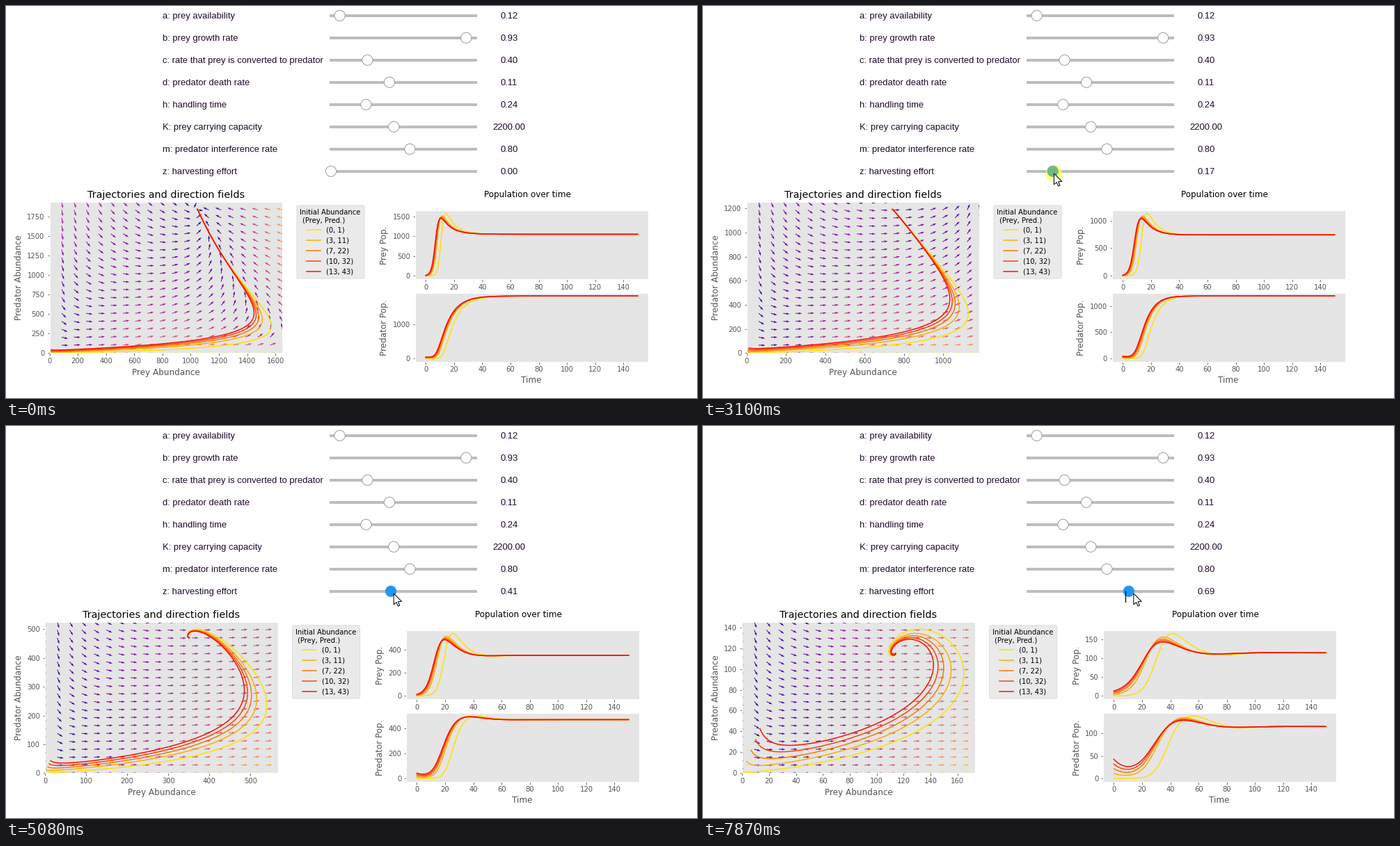
A matplotlib script for the animation above (8 s loop, 993 by 564 pixels).

```python
import numpy as np
import matplotlib.pyplot as plt
from matplotlib.animation import FuncAnimation
from matplotlib.patches import Circle, FancyBboxPatch, Polygon, Rectangle
from matplotlib.transforms import Affine2D

W, H, DPI = 993, 564, 96
PX = 72 / DPI                 # points per pixel
FRAMES, STEP = 160, 50
GREY, BLUE = "#555555", "#2196f3"
COLORS = plt.cm.autumn_r(np.linspace(0.12, 0.95, 5))

plt.rcParams.update({
    "font.family": "DejaVu Sans", "font.size": 10 * PX,
    "axes.facecolor": "#e5e5e5", "axes.edgecolor": "white",
    "axes.linewidth": PX, "lines.linewidth": 1.5 * PX,
    **{f"{k}tick.{name}": v for k in "xy" for name, v in {
        "color": GREY, "labelsize": 10 * PX, "major.size": 3.5 * PX,
        "major.pad": 3.5 * PX, "major.width": 0.8 * PX}.items()},
})

# ---- model: logistic prey, interfering predators, harvested prey ----
A, B, C, D, HT, K, M = 0.1157, 0.928, 0.40, 0.1105, 0.24, 2200, 0.80
T = np.linspace(0, 150, 1501)
START = np.array([np.linspace(0.2, 13.3, 5), np.linspace(1, 42.7, 5)])


def rates(n, p, z=0.0):
    pm = np.maximum(p, 1e-9) ** M
    eaten = A * n * p / (pm + A * HT * n)
    return np.array([B * n * (1 - n / K) - eaten - z * n, C * eaten - D * p])


def solve(z):
    s, out, dt = START, [START], T[1] - T[0]
    for _ in T[1:]:
        k1 = rates(*s, z)
        k2 = rates(*(s + dt / 2 * k1), z)
        k3 = rates(*(s + dt / 2 * k2), z)
        k4 = rates(*(s + dt * k3), z)
        s = s + dt / 6 * (k1 + 2 * k2 + 2 * k3 + k4)
        out.append(s)
    return np.array(out)      # time, species, run


# ---- rhythm (ms): drag, release, redraw left, redraw right, repeat ----
EFFORT = [0, 0.08, 0.17, 0.28, 0.41, 0.50, 0.601, 0.69]
RUNS = [solve(z) for z in EFFORT[:-1]]
BEAT, DRAG_AT, DRAG_TIME = 1020, 1120, 240
PRESS_LEAD, RELEASE_LAG = 100, 490
LEFT_AT, LEFT_BEAT, RIGHT_AT = 1750, 990, 1960


def ramp(t, start, length):
    return min(max((t - start) / length, 0), 1)


def redraws(t, first, beat):
    return int(np.clip((t - first) // beat + 1, 0, len(RUNS) - 1))


def effort(t):
    done = sum(ramp(t, DRAG_AT + BEAT * k, DRAG_TIME)
               for k in range(len(EFFORT) - 1))
    return np.interp(done, range(len(EFFORT)), EFFORT)


def pressed(t):
    since = t - DRAG_AT + PRESS_LEAD
    return since >= 0 and since % BEAT < PRESS_LEAD + RELEASE_LAG


def pointer(t, z):
    enter = 1 - (1 - ramp(t, 50, 270)) ** 2
    x = 891 - 394 * enter - 30 * ramp(t, 520, 300) + 220 * z
    return x, 546 - 305 * enter


# ---- figure ----
fig = plt.figure(figsize=(W / DPI, H / DPI), dpi=DPI, facecolor="white")
phase, prey, pred = (fig.add_axes([0, 0, 1, 1], label=s) for s in "abc")
top = fig.add_axes([0, 0, 1, 1], zorder=5)
top.set(xlim=(0, W), ylim=(H, 0))
top.set_axis_off()

# both panels slide left as their tick labels get narrower
slide_left, slide_right = Affine2D(), Affine2D()
LEFT, RIGHT = slide_left + top.transData, slide_right + top.transData


def place(ax, x, y, h):
    ax.set_position([x / W, 1 - (y + h) / H, 334.8 / W, h / H])


def text(x, y, s, size, **kw):
    return top.text(x, y, s, fontsize=size * PX, **kw)


def label(x, y, s, size=12, color=GREY, **kw):
    text(x, y, s, size, color=color, ha="center",
         **{"va": "center", **kw})


def draw_phase(i):
    run = RUNS[i]
    phase.clear()
    xmax, ymax = run.max(axis=(0, 2)) * 1.05
    n, p = np.meshgrid(np.linspace(0, xmax, 20), np.linspace(0, ymax, 20))
    u, v = rates(n, p)
    speed = np.hypot(u, v)
    unit = np.where(speed == 0, 1, speed)
    phase.quiver(n, p, u / unit, v / unit, speed, cmap="plasma",
                 scale=36, width=0.003)
    for k, c in enumerate(COLORS):
        phase.plot(run[:, 0, k], run[:, 1, k], color=c)
    phase.set(xlim=(0, xmax), ylim=(0, ymax))


def draw_series(i):
    for species, ax in enumerate((prey, pred)):
        ax.clear()
        for k, c in enumerate(COLORS):
            ax.plot(T, RUNS[i][:, species, k], color=c)


# sliders: name, shown value, knob position along the track
SANS = dict(family="Liberation Sans", color="#220a2c", va="baseline")
SLIDERS = [("a: prey availability", "0.12", 0.06),
           ("b: prey growth rate", "0.93", 0.925),
           ("c: rate that prey is converted to predator", "0.40", 0.25),
           ("d: predator death rate", "0.11", 0.4),
           ("h: handling time", "0.24", 0.24),
           ("K: prey carrying capacity", "2200.00", 0.43),
           ("m: predator interference rate", "0.80", 0.54),
           ("z: harvesting effort", "0.00", 0)]


def knob_x(part):
    return 467 + 210 * part


for row, (name, value, part) in enumerate(SLIDERS):
    y = 13.8 + 32 * row
    text(225, y + 4.4, name, 13, **SANS)
    readout = text(723, y + 4.4, value, 13, ha="center", **SANS)
    top.add_patch(Rectangle((465, y - 2), 211.5, 4, fc="#bdbdbd", ec="none"))
    knob = top.add_patch(Circle((knob_x(part), y), 7.6, fc="white",
                                ec="#9e9e9e", lw=PX, zorder=2))
KNOB_Y = y

# pointer
halo = top.add_patch(Circle((0, 0), 12, fc="#ffff40", alpha=0.7, ec="none",
                            zorder=3))
glow = top.add_patch(Circle((0, 0), 8, fc="#70b888", ec="none", zorder=4))
beam, = top.plot([], [], color="black", lw=1.2 * PX, zorder=5)
ARROW = np.array([(0, 0), (0, 16), (3.7, 12.6), (6.2, 18.2), (8.6, 17.1),
                  (6.2, 11.6), (11.5, 11.6)])
arrow = top.add_patch(Polygon(ARROW, fc="white", ec="black", lw=PX, zorder=6))

# captions
label(229.9, 276, "Trajectories and direction fields", 14.4, "black",
      va="baseline", transform=LEFT)
label(229.9, 527, "Prey Abundance", transform=LEFT)
label(18.4, 391, "Predator Abundance", rotation=90)
label(544, 344, "Prey Pop.", rotation=90, transform=LEFT)
label(544, 463, "Predator Pop.", rotation=90, transform=LEFT)
label(749, 275, "Population over time", 12, "black", va="baseline",
      transform=RIGHT)
label(755, 539, "Time", transform=RIGHT)

# legend
top.add_patch(FancyBboxPatch(
    (420, 289), 93, 101, boxstyle="round,pad=2,rounding_size=2",
    fc="#eaeaea", ec="#dddddd", lw=PX, transform=LEFT))
text(422, 297, "Initial Abundance", 10, va="center", transform=LEFT)
text(425.5, 308.5, "(Prey, Pred.)", 10, va="center", transform=LEFT)
for k, (c, (n, p)) in enumerate(zip(COLORS, START.T)):
    y = 322.3 + 15 * k
    text(460, y + 0.5, f"({n:.0f}, {p:.0f})", 10, va="center", transform=LEFT)
    top.plot([432, 452], [y, y], color=c, transform=LEFT)

shown = {}


def show_panels(li, ri):
    if shown.get("left") != li:
        draw_phase(li)
    if shown.get("right") != ri:
        draw_series(ri)
    shown.update(left=li, right=ri)

    narrow = [6.4 * (RUNS[i][:, 1].max() < 950) for i in (li, ri)]
    dl, dr = narrow[0], sum(narrow)
    slide_left.clear().translate(-dl, 0)
    slide_right.clear().translate(-dr, 0)
    place(phase, 62.5 - dl, 282, 217.4)
    place(prey, 588 - dr, 294, 98.8)
    place(pred, 588 - dr, 412.7, 98.8)


def update(frame):
    t = (frame + 0.5) * STEP
    show_panels(redraws(t, LEFT_AT, LEFT_BEAT), redraws(t, RIGHT_AT, BEAT))

    z = effort(t)
    readout.set_text(f"{z:.2f}")
    center, tip = (knob_x(z), KNOB_Y), pointer(t, z)
    hover = t >= 790
    knob.set_center(center)
    knob.set(fc=BLUE if hover else "white", ec=BLUE if hover else "#9e9e9e")

    arrow.set_xy(ARROW + tip)
    arrow.set_visible(t >= 50)
    halo.set_center(tip)
    glow.set_center(center)
    glow.set_clip_path(halo)
    for a in (halo, glow):
        a.set_visible(pressed(t))

    # a text caret flickers by during the first and last drag
    beam.set_data([tip[0] - 12] * 2, [KNOB_Y, KNOB_Y + 15])
    beam.set_visible(1120 <= t % 6500 < 1440)
    return []


anim = FuncAnimation(fig, update, frames=FRAMES, interval=STEP, repeat=True,
                     blit=False)
plt.show()
```
